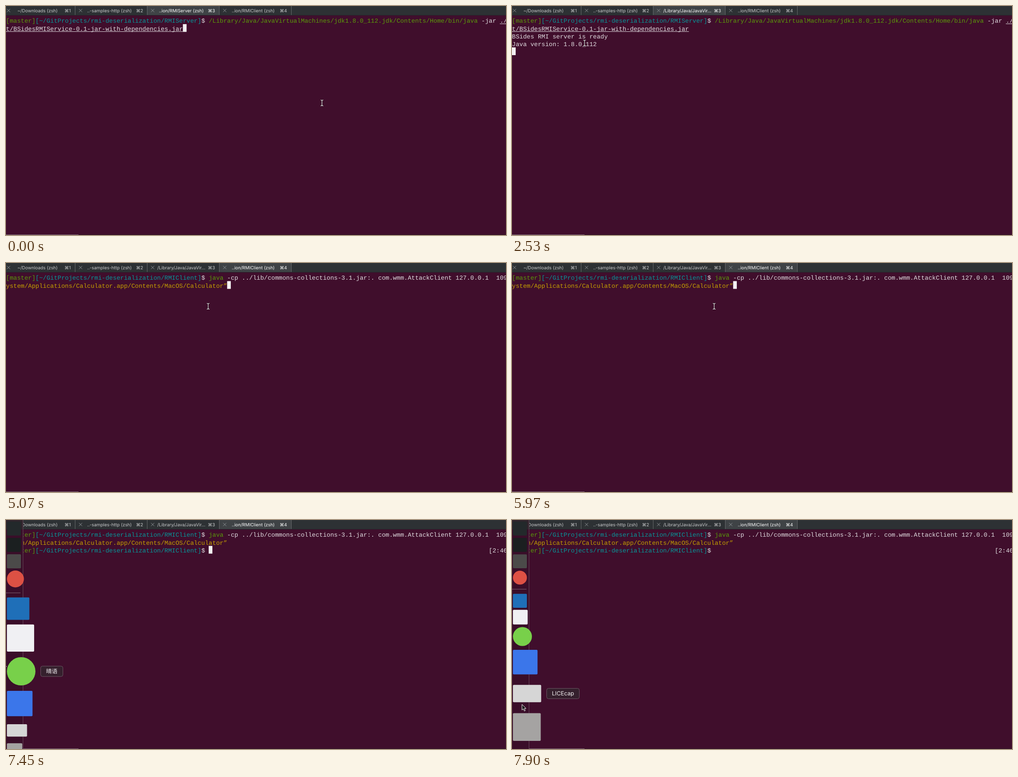
An HTML page that plays this animation: 1103x508 px, repeating every 8000 ms.

```html
<!DOCTYPE html>
<html lang="en">
<head>
<meta charset="utf-8">
<title>Terminal session</title>
<style>
  html, body { margin: 0; width: 100%; height: 100%; overflow: hidden; background: #400e2c; }
  svg { display: block; width: 100%; height: 100%; }
  text { white-space: pre; text-rendering: geometricPrecision; }
  .mono { font: 13.55px "Liberation Mono", monospace; }
  .tab { font: 9.9px Inter, sans-serif; text-anchor: middle; }
  .label { font: 12.5px Inter, "Noto Sans CJK SC", "Noto Sans CJK", sans-serif; text-anchor: middle; }
</style>
</head>
<body>
<svg id="stage" viewBox="0 0 1103 508"></svg>
<script>
const LOOP = 8000, TICK = 148, BLINK = 450;
const CELL = 8.13, ROW = 17.2, TOP = 23;
const WHITE = '#e0dce0', GREEN = '#5a9a0a', CYAN = '#06989a', YELLOW = '#c4a000';
const START = 1040, READY = 1340, SELECT = 2680, SWITCH = 5070, RUN = 6120, DONE = 6410, DOCK = 6850;
const stage = document.getElementById('stage');

// Pointer glides, moved once per tick: start, ticks, end x, end y, downward bow
const GLIDES = [
  [1630, 7, 160, 82, 65],
  [3120, 5, 446, 96, 26],
  [DONE, 4, -8, 306, 0],
  [7446, 1, -8, 316, 0],
  [7594, 3, 22, 409, 0]
];
// Block cursor: start, column, row, time of its first blink
const CARET = [
  [0, 48, 1, 600], [START, 0, 2, LOOP], [READY, 0, 4, 2820],
  [SWITCH, 60, 1, 5520], [RUN, 0, 2, LOOP], [DONE, 55, 2, 7900]
];
const ICONS = [
  { fill: '#23292b' }, { fill: '#1b1f20' }, { fill: '#4b4a49' }, { fill: '#dd5144', round: true },
  { fill: '#1f6fb8' }, { fill: '#f0f0f3', name: 'java' },
  { fill: '#78d04a', round: true, name: '晴语' }, { fill: '#3b76ea' },
  { fill: '#d6d6d6', flat: .62, name: 'LICEcap' }, { fill: '#a5a3a2' }
];

const clamp = v => Math.min(1, Math.max(0, v));
const smooth = v => v * v * (3 - 2 * v);
const ticks = (t, start) => Math.floor((t - start) / TICK) + 1;
const rect = (x, y, w, h, fill, extra = '') =>
  `<rect x="${x}" y="${y}" width="${w}" height="${h}" fill="${fill}" ${extra}/>`;
const put = (col, row, fill, str, extra = '') =>
  `<text class="mono" x="${col * CELL}" y="${37.3 + row * ROW}" fill="${fill}" ${extra}>${str}</text>`;
const link = (col, row, str) => put(col, row, WHITE, str) +
  rect(col * CELL, TOP + 16 + row * ROW, str.length * CELL, 1, WHITE);

function prompt(row, dir) {
  return put(0, row, GREEN, '[master]') +
    put(8, row, CYAN, `[~/GitProjects/rmi-deserialization/${dir}]`) +
    put(53, row, WHITE, '$', 'font-weight="bold"');
}

function tabs(t) {
  const active = t < SWITCH ? 2 : 3;
  const titles = [
    '~/Downloads (zsh)', '..-samples-http (zsh)',
    t < START ? '..ion/RMIServer (zsh)' : '/Library/Java/JavaVir…',
    t >= RUN && t < DONE ? 'java -cp ../lib/com…' : '..ion/RMIClient (zsh)'
  ];
  let out = rect(0, 0, 1103, 21, '#2d3134');
  titles.forEach((title, i) => {
    const x = 159 * i, on = i === active;
    const style = on ? 'fill="#fff" font-weight="600"' : 'fill="#c9cacb"';
    const word = (cx, str) =>
      `<text class="tab" x="${cx + 158.6 * i}" y="13.7" ${style}>${str}</text>`;
    if (on) out += rect(x - 6, 0, 158, 21, '#3f4346');
    out += rect(x + 152, 0, 1, 20, '#66696b') +
      `<path d="M${x + 2} 6.5l7 7m0-7l-7 7" stroke="#92969a"/>` +
      word(69.5, title) + word(136, '⌘' + (i + 1));
  });
  return out + rect(0, 20, 1103, 1, '#24262a');
}

function server(t) {
  let out = prompt(0, 'RMIServer') +
    put(55, 0, GREEN, '/Library/Java/JavaVirtualMachines/jdk1.8.0_112.jdk/Contents/Home/bin/java') +
    put(129, 0, WHITE, '-jar') + link(134, 0, './') +
    link(0, 1, 't/BSidesRMIService-0.1-jar-with-dependencies.jar');
  if (t >= READY) {
    const picked = t >= SELECT;
    out += put(0, 2, WHITE, 'BSides RMI server is ready') + put(0, 3, WHITE, 'Java version:');
    if (picked) out += rect(14 * CELL - 1, TOP + 3 * ROW, 9 * CELL, ROW, '#b9d9fd');
    out += put(14, 3, picked ? '#111' : WHITE, '1.8.0_112');
  }
  return out;
}

function client(t) {
  let out = prompt(0, 'RMIClient') + put(55, 0, GREEN, 'java') +
    put(60, 0, WHITE, '-cp ../lib/commons-collections-3.1.jar:. com.wmm.AttackClient 127.0.0.1  1099') +
    put(0, 1, YELLOW, 'ystem/Applications/Calculator.app/Contents/MacOS/Calculator”');
  if (t >= DONE) out += prompt(2, 'RMIClient') + put(131, 2, WHITE, '[2:46');
  return out;
}

function caret(t) {
  const [, col, row, blink] = CARET.filter(c => c[0] <= t).pop();
  const hidden = t >= blink && Math.floor((t - blink) / BLINK) % 2 === 0;
  return hidden ? '' : rect(col * CELL, TOP + row * ROW, CELL, ROW, '#f3f1f2');
}

function pointer(t) {
  let x = 697, y = 215;
  for (const [start, count, toX, toY, bow] of GLIDES) {
    const p = smooth(clamp(ticks(t, start) / count));
    x += (toX - x) * p;
    y += (toY - y) * p + bow * Math.sin(Math.PI * p);
  }
  return [x, y];
}

function label(name, y, alpha) {
  const width = 24 + [...name].reduce((w, c) => w + (c > '\u00ff' ? 13 : 7), 0);
  return `<g opacity="${alpha}">` +
    rect(76.5, y - 11.5, width - 1, 23, '#35202d', 'rx="4" stroke="#6a5863"') +
    `<text class="label" x="${76 + width / 2}" y="${y + 4.5}" fill="#f2eff1">${name}</text></g>`;
}

// Icons swell around the pointer and push the ones below them down.
function dock(t, mouseY) {
  if (t < DOCK) return '';
  const shown = clamp((ticks(t, DOCK) - .6) / 3), shift = -76 * (1 - smooth(shown));
  const focus = mouseY * .028 - 3.05;
  const pitch = i => 36.3 + 38 * Math.cos(Math.PI / 8 * Math.min(4, Math.abs(i - focus))) ** 2;
  let out = rect(-80, 0, 117, 508, '#3a0e29') + rect(-80, 0, 117, 21, '#30242c') +
    rect(37, 0, 1, 508, '#674a5b');
  let y = 19, hover, hoverY;
  ICONS.forEach((icon, i) => {
    if (i) y += pitch(i - .5);
    if (i === 4) {
      out += rect(0, y - pitch(3.5) + .69 * pitch(3), 32, 1, '#806476');
      y += 15;
    }
    const w = .85 * pitch(i), h = w * (icon.flat || 1);
    out += rect(2, y - h / 2, w, h, icon.fill, `rx="${icon.round ? w / 2 : 2}"`);
    if (y <= mouseY + 26) [hover, hoverY] = [icon, y];
  });
  if (hover.name) out += label(hover.name, hoverY, shown);
  return `<g transform="translate(${shift} 0)">${out}</g>`;
}

function mouse(t, x, y) {
  const beam = 'M-3-6.5Q0-6.5 0-4.5V4.5Q0 6.5-3 6.5M3-6.5Q0-6.5 0-4.5M0 4.5Q0 6.5 3 6.5';
  const shape = t < DOCK
    ? `<path d="${beam}" fill="none" stroke="#1c0613" stroke-width="2.6"/>
       <path d="${beam}" fill="none" stroke="#f4f4f4" stroke-width="1.2"/>`
    : '<path d="M0 0V12.5L3 9.8 5.2 14.8 7.2 13.9 5.1 9.1H9Z" fill="#111" stroke="#fff"/>';
  return `<g transform="translate(${x} ${y})">${shape}</g>`;
}

function scene(t) {
  const [x, y] = pointer(t);
  return rect(0, 0, 1103, 508, '#400e2c') + tabs(t) +
    (t < SWITCH ? server(t) : client(t)) + caret(t) +
    rect(0, 507, 1103, 1, '#2c1522') + rect(0, 507, 160, 1, '#85757e') +
    dock(t, y) + mouse(t, x, y);
}

let shown = '';
function draw() {
  const next = scene(performance.now() % LOOP);
  if (next !== shown) stage.innerHTML = shown = next;
  requestAnimationFrame(draw);
}
draw();
</script>
</body>
</html>
```
